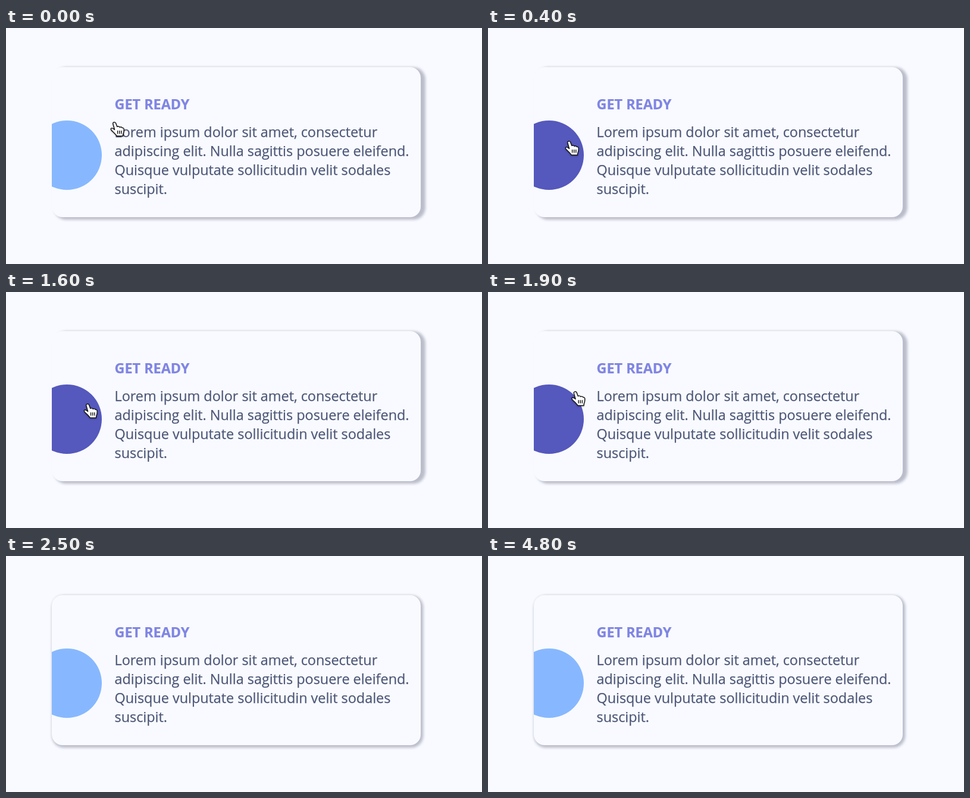
An HTML page for the animation above (5 s loop, 800 by 398 pixels).

```html
<!DOCTYPE html>
<html lang="en">
<head>
<meta charset="utf-8">
<title>Hover card</title>
<style>
  html, body { margin: 0; width: 100%; height: 100%; overflow: hidden; background: #f8faff; }
  body { position: relative; font: 23.38px/32px "Open Sans", sans-serif; }
  .card {
    position: absolute; left: 77px; top: 66px; width: 619.5px; height: 253px;
    border-radius: 18px; overflow: hidden; background: #f8faff;
    box-shadow: 2.3px 2.3px 4px 2px #bbbdcb;
  }
  .card.hover { box-shadow: 5.8px 2.3px 4px 2px #bbbdcb; }
  .dot {
    position: absolute; left: -33.1px; top: 89.9px;
    width: 116.8px; height: 116.8px; border-radius: 50%; background: #87b8ff;
  }
  .dot.hover { background: #5558bc; }
  h1, p {
    position: absolute; left: 105.5px; margin: 0; font-size: inherit;
    white-space: nowrap; -webkit-text-stroke: .25px;
  }
  h1 { top: 46px; font-weight: 700; color: #7f85e3; }
  p { top: 93px; color: #4d5777; }
  svg { position: absolute; left: 0; top: 0; filter: drop-shadow(0 1px 1px #0005); }
</style>
</head>
<body>
<div class="card">
  <div class="dot"></div>
  <h1>GET READY</h1>
  <p>Lorem ipsum dolor sit amet, consectetur<br>adipiscing elit. Nulla sagittis posuere eleifend.<br>Quisque vulputate sollicitudin velit sodales<br>suscipit.</p>
</div>
<svg class="hand" width="26" height="28" fill="#fff" stroke="#111" stroke-width="1.4" stroke-linejoin="round">
  <path d="M5 4C4.4 1.2 8.6 .4 9.7 3L12 9C13.5 8 15.7 8.4 16.3 10C17.8 9 19.8 9.4 20.4 11C22 10.5 23.4 11.5 23.4 13.5C23.6 17 23 19 22 21.5L21.6 24.8H11.5C10 22 7 19.5 4 16.6C1 14 .8 11.6 3 11.4C4.6 11.3 6.2 12.8 7.8 14Z"/>
  <path d="M12.8 15.5V21M15.9 15.5V21M19 15.5V21"/>
</svg>
<script>
const LOOP = 5000, STEP = 100;
const card = document.querySelector('.card');
const dot = document.querySelector('.dot');
const hand = document.querySelector('.hand');

const progress = (t, from, to) => Math.min(1, Math.max(0, (t - from) / (to - from)));

// The hand glides in and settles on the dot, then flicks away upwards.
function handPosition(t) {
  const enter = 1 - (1 - progress(t, 0, 400)) ** 3;
  const drift = progress(t, 1400, 1600);
  const leave = progress(t, 1400, 2000) ** 6;
  return [
    174.8 - 46 * enter + drift + 28.5 * leave,
    157.5 + 32 * enter - 2 * drift - 62.3 * leave
  ];
}

function draw(now) {
  const t = Math.floor(now % LOOP / STEP) * STEP;
  const onCard = t < 2100;
  const [x, y] = handPosition(t);
  hand.style.transform = `translate(${x}px, ${y}px)`;
  hand.style.visibility = onCard ? 'visible' : 'hidden';
  card.classList.toggle('hover', onCard);
  dot.classList.toggle('hover', t >= 200 && t < 2000);
}

const start = performance.now();
function tick() {
  draw(performance.now() - start);
  requestAnimationFrame(tick);
}
tick();
</script>
</body>
</html>
```
